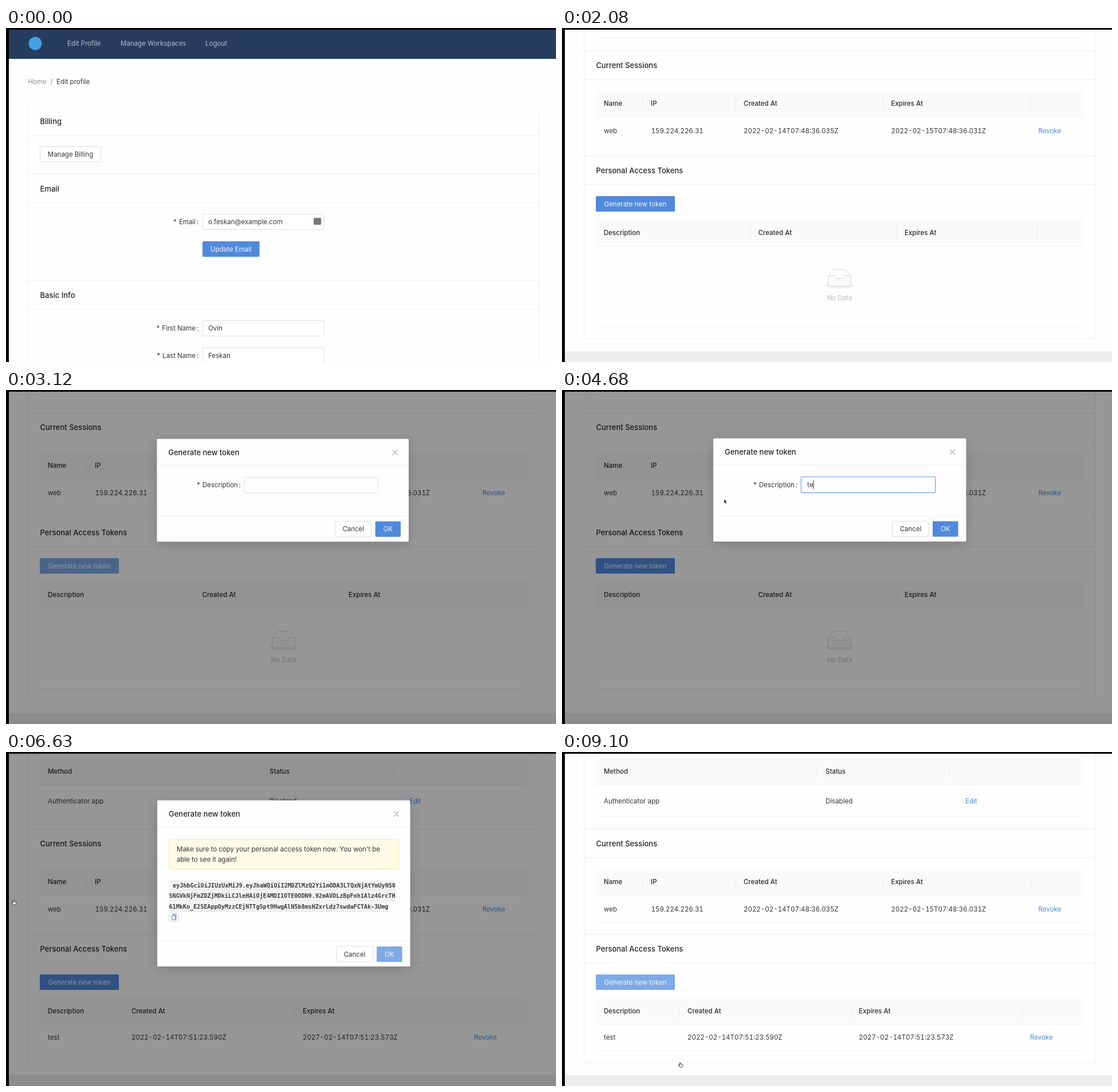
These frames come from a looping animation (960 by 584 pixels, 9.23 s). An HTML page:

```html
<!DOCTYPE html>
<html lang="en">
<head>
<meta charset="utf-8">
<title>Access tokens</title>
<style>
  html, body { margin: 0; width: 100%; height: 100%; overflow: hidden; background: #fefefe; }
  svg { display: block; width: 960px; height: 584px; }
  text { font: 11.5px Inter, sans-serif; font-variant-numeric: tabular-nums; fill: #363636; white-space: pre; }
  .h { font-size: 13px; font-weight: 500; fill: #262626; }
  .b { font-weight: 500; fill: #2b2b2b; }
  .link { fill: #4f8bd8; }
  .white { fill: #f4f8fe; }
  .nav { fill: #b4bdca; }
  .dim { fill: #8f8f8f; }
  .none { fill: #bdbdbd; }
  .mid { text-anchor: middle; }
  .end { text-anchor: end; }
  .code { font: bold 10.1px "DejaVu Sans Mono", monospace; fill: #3c3c3c; }
  #modal { filter: drop-shadow(0 4px 9px rgba(0, 0, 0, .16)); }
</style>
</head>
<body>
<svg id="stage" viewBox="0 0 960 584"></svg>
<script>
const LOOP = 9230, STEP = 130;
const BLUE = '#5189dc', HOVER = '#7eaae7', EDGE = '#efefef', FIELD = '#dedede';
const $ = id => document.getElementById(id);

// ---- drawing helpers
const text = (x, y, s, cls = '') => `<text x="${x}" y="${y}" dy=".36em" class="${cls}">${s}</text>`;
const box = (x, y, w, h, fill, stroke = 'none', extra = '') =>
  `<rect x="${x}" y="${y}" width="${w}" height="${h}" fill="${fill}" stroke="${stroke}" ${extra}/>`;
const rule = (y, x1 = 39, x2 = 930, color = EDGE) => box(x1, y, x2 - x1, 1, color);
const group = (id, s) => `<g id="${id}">${s}</g>`;
const field = (x, y, w, s = '') => box(x + .5, y + .5, w - 1, 27, '#fff', FIELD, 'rx="1.5"') + text(x + 10, y + 14, s);
const button = (x, y, w, s, id) => id
  ? box(x, y, w, 27, BLUE, 'none', `id="${id}" rx="1.5"`) + text(x + w / 2, y + 13.5, s, 'white mid')
  : box(x + .5, y + .5, w - 1, 27, '#fff', FIELD, 'rx="1.5"') + text(x + w / 2, y + 14, s, 'mid');
const label = (x, y, s) => text(x, y, `* ${s}<tspan dx="2">:</tspan>`, 'end');
const section = (y, s, first) => (first ? '' : rule(y - .5, 39, 930, '#ebebeb')) + text(59.5, y + 25.5, s, 'h') + rule(y + 49.5);

function table(y, h, heads, seps) {
  return box(59, y, 851, h, '#fafafa') + rule(y + h - .5, 59, 910, '#f0f0f0') +
    heads.map(([x, s]) => text(x, y + h / 2, s, 'b')).join('') +
    seps.map(x => box(x, y + h / 2 - 10.5, 1, 21, '#ebebeb')).join('');
}

function formRows(y, rows, action) {
  const end = y + rows.length * 47.5;
  return rows.map(([name, value], i) =>
    label(336, y + i * 47.5, name) + field(343, y - 14 + i * 47.5, 212.5, value)).join('') +
    button(343, end - 13.5, 99.5, action, 'b' + y);
}

// ---- page
const upper =
  box(5, 0, 955, 54, '#273d5d') + '<circle cx="51" cy="27" r="11.5" fill="#43a3e2"/>' +
  text(107, 27, 'Edit Profile', 'nav') + text(200, 27, 'Manage Workspaces', 'nav') + text(348, 27, 'Logout', 'nav') +
  text(38.5, 94, 'Home', 'dim') + text(77.5, 94, '/', 'dim') + text(88, 94, 'Edit profile') +
  section(138, 'Billing', true) + button(59, 206.5, 107, 'Manage Billing') +
  section(255.5, 'Email') + formRows(339, [['Email', 'o.feskan@example.com']], 'Update Email') +
  box(537, 332, 13, 12, '#777', 'none', 'rx="1.5"') +
  section(442, 'Basic Info') + formRows(525, [['First Name', 'Ovin'], ['Last Name', 'Feskan']], 'Update Info') +
  section(675, 'Password') +
  formRows(758, [['Current Password', ''], ['New Password', ''], ['Confirm Password', '']], 'Update') +
  section(957, 'Two-Factor Authentication') +
  table(1027, 46.5, [[73, 'Method'], [460, 'Status']], [445, 675.5]) +
  text(73, 1102, 'Authenticator app') + text(460, 1102, 'Disabled') + text(704, 1102, 'Edit', 'link') +
  rule(1128, 59, 910) +
  section(1151, 'Current Sessions') +
  table(1220, 46.5, [[73, 'Name'], [155, 'IP'], [317, 'Created At'], [574.5, 'Expires At']], [140.5, 302.5, 560, 817.5]) +
  text(73, 1290.5, 'web') + text(155.5, 1290.5, '159.224.226.31') +
  text(317, 1290.5, '2022-02-14T07:48:36.035Z') + text(574.5, 1290.5, '2022-02-15T07:48:36.031Z') +
  text(831.5, 1290.5, 'Revoke', 'link') + rule(1313.5, 59, 910) +
  section(1335, 'Personal Access Tokens') + button(59, 1405, 138, 'Generate new token', 'gen');

const card = bottom =>
  box(38.5, 137.5, 892, bottom - 138, 'none', EDGE, 'rx="2"') + box(5, bottom + 21, 955, 60, '#eeeeef');

const emptyList = card(1655) +
  table(1446, 46, [[73, 'Description'], [342.5, 'Created At'], [598, 'Expires At']], [328.5, 584, 829]) +
  `<g transform="translate(465 1533)" stroke="#d8d8d8">
     <ellipse cx="19.5" cy="28" rx="26" ry="5.5" fill="#f2f2f2" stroke="none"/>
     <path d="M0 11L9 0H30L39 11V27Q39 29 37 29H2Q0 29 0 27Z" fill="#fefefe"/>
     <path d="M0 11H11C11 14 12.500 16 15 16H24C26.500 16 28 14 28 11H39V27Q39 29 37 29H2Q0 29 0 27Z" fill="#fafafa"/>
   </g>` + text(484.5, 1583, 'No Data', 'none mid') + rule(1633, 59, 910);

const tokenList = card(1560) +
  table(1446, 46, [[73, 'Description'], [219, 'Created At'], [518, 'Expires At']], [204.5, 504.5, 802.5]) +
  text(73, 1515, 'test') + text(219, 1515, '2022-02-14T07:51:23.590Z') +
  text(518, 1515, '2027-02-14T07:51:23.573Z') + text(817, 1515, 'Revoke', 'link') + rule(1538, 59, 910);

// ---- dialog
const token = [
  'eyJhbGciOiJIUzUxMiJ9.eyJhaWQiOiI2MDZlMzQ2Yi1mODA3LTQxNjAtYmUyNS0',
  '5NGVkNjFmZDZjMDkiLCJleHAiOjE4MDI1OTE0ODN9.92mAVDLzBpFnh1Alz4GrcTH',
  '61MkKo_E2SEAppOyMzzCEjNTTg5pt9HwgAlN5b8msHZxrLdz7swdaFCTAk-3Umg'
];
const modal =
  box(264, 84.5, 441.5, 180.5, '#fefefe', 'none', 'id="panel" rx="1.5"') +
  text(284, 108.5, 'Generate new token', 'h') +
  '<path d="M677 104l9 9m0-9l-9 9" stroke="#808080" fill="none"/>' + rule(130.5, 264, 705.5) +
  group('form', label(411, 165.5, 'Description') +
    box(416, 150.5, 237, 30.5, '#d6e4f8', 'none', 'id="glow" rx="3"') +
    box(417.5, 152, 234, 27.5, '#fff', FIELD, 'id="input" rx="1.5"') +
    '<text id="typed" x="428" y="165.5" dy=".36em"></text>' + box(428, 158, 1, 15, '#222', 'none', 'id="caret"')) +
  group('result', box(284.5, 152.5, 401, 52, '#fefbe6', '#fae8a8', 'rx="1.5"') +
    text(298, 169.5, 'Make sure to copy your personal access token now. You won\'t be') +
    text(298, 187.5, 'able to see it again!') +
    token.map((s, i) => {
      const y = 233 + i * 18.6, w = i < 2 ? 395 : 383;
      return box(284.5, y - 8.5, w, 17, '#f3f3f3') + rule(y + 8, 284.5, 284.5 + w, '#e0e0e0') +
        text(i ? 284.5 : 291, y, s, 'code');
    }).join('') +
    box(284.5, 281.5, 17, 15, '#f4f4f4', '#dfdfdf', 'rx="2"') +
    '<path id="copy" d="M290 285.500h5.500v8h-5.500zM291.500 285.500v-1.500h5.500v8h-1.500" fill="none" stroke="#5a8cd6"/>' +
    '<path id="check" d="M289 289l2.500 3 5.500-6" fill="none" stroke="#777" stroke-width="1.200"/>') +
  group('foot', rule(219.5, 264, 705.5) + button(576, 229, 65, 'Cancel') + button(647, 229.5, 44.5, 'OK', 'ok'));

$('stage').innerHTML =
  box(0, 0, 960, 584, '#fefefe') +
  group('page', upper + group('empty', emptyList) + group('list', tokenList)) +
  box(0, 0, 960, 584, '#000', 'none', 'id="mask"') + group('modal', modal) +
  group('cursor',
    '<path id="arrow" d="M0 0V7L1.700 5.500 3 8 4.200 7.400 3 5.100H5.200Z" fill="#111" stroke="#fff" stroke-width=".5"/>' +
    '<path id="hand" d="M-1.500 1V-3.500Q-.700 -4.500 0 -3.500V-1.500L3 -1Q4 0 3.500 2L2.500 4H-1.500L-4 0Q-3.500 -1.300 -1.500 1Z" fill="#fff" stroke="#333" stroke-width=".9"/>') +
  box(0, 0, 5, 584, '#000') + box(0, 0, 960, 3, '#000');

// ---- motion
const clamp = v => Math.max(0, Math.min(1, v));
const within = (t, ...spans) => spans.some(([a, b]) => t >= a && t < b);
const show = (id, on) => $(id).style.display = on ? '' : 'none';

function bezier(x1, y1, x2, y2) {
  const at = (u, a, b) => 3 * (1 - u) ** 2 * u * a + 3 * (1 - u) * u * u * b + u ** 3;
  return x => {
    let lo = 0, hi = 1;
    for (let i = 0; i < 24; i++) {
      const m = (lo + hi) / 2;
      if (at(m, x1, x2) < x) lo = m; else hi = m;
    }
    return at(lo, y1, y2);
  };
}
const outCirc = bezier(.08, .82, .17, 1), inOutCirc = bezier(.78, .14, .15, .86);

const OPEN = 2888, SAVED = 5720, COPIED = 7280, CLOSE = 8106;
const tracks = [
  [[3510, 215, 290], [4030, 283, 191], [5070, 283, 191], [5460, 60, 250]],
  [[6630, 14, 263], [6890, 14, 263], [7280, 120, 300], [7540, 200, 320], [7930, 341, 345],
   [8320, 341, 345], [8710, 260, 450], [9100, 207, 547]]
];

function cursorAt(t) {
  const track = tracks.find(k => t >= k[0][0] && t <= k[k.length - 1][0]);
  if (!track) return null;
  const i = Math.max(1, track.findIndex(p => p[0] >= t));
  const [a, b] = [track[i - 1], track[i]], f = (t - a[0]) / (b[0] - a[0]);
  return [a[1] + (b[1] - a[1]) * f, a[2] + (b[2] - a[2]) * f];
}

function draw(t) {
  const saved = t >= SAVED;
  const x = clamp(t / 1430) ** .85;
  const scroll = saved ? 1016 : 1111 * x * x * (3 - 2 * x);
  $('page').setAttribute('transform', `translate(0 ${-scroll})`);
  show('empty', !saved);
  show('list', saved);
  $('gen').setAttribute('fill', within(t, [2210, 3640], [8710, LOOP]) ? HOVER : BLUE);

  const shown = t < CLOSE ? outCirc(clamp((t - OPEN) / 300)) : 1 - inOutCirc(clamp((t - CLOSE) / 200));
  const fade = clamp((t - OPEN) / 200) - clamp((t - CLOSE) / 200);
  const s = .2 + .8 * shown;
  $('mask').setAttribute('opacity', .41 * fade);
  show('modal', shown > .01);
  $('modal').style.opacity = shown;
  $('modal').setAttribute('transform', `translate(${131.6 * (1 - s)} ${304.6 * (1 - s)}) scale(${s})`);

  show('form', !saved);
  show('result', saved);
  $('panel').setAttribute('height', saved ? 290.5 : 180.5);
  $('foot').setAttribute('transform', `translate(0 ${saved ? 110.500 : 0})`);
  show('copy', t < COPIED);
  show('check', t >= COPIED);
  $('ok').setAttribute('fill', within(t, [5330, 6760], [7930, LOOP]) ? HOVER : BLUE);

  const focus = within(t, [3900, 5330]);
  const count = Math.round(4 * clamp((t - 4420) / 520));
  $('typed').textContent = 'test'.slice(0, count);
  $('input').setAttribute('stroke', focus ? '#76a3e0' : FIELD);
  show('glow', focus);
  show('caret', focus);
  if (focus) $('caret').setAttribute('x', 428 + (count ? $('typed').getComputedTextLength() : 0));

  const p = cursorAt(t), hand = within(t, [6630, 7020], [8840, LOOP]);
  show('cursor', p);
  show('hand', hand);
  show('arrow', !hand);
  if (p) $('cursor').setAttribute('transform', `translate(${p[0]} ${p[1]})`);
}

const start = performance.now();
function tick() {
  const t = (performance.now() - start) % LOOP;
  draw(Math.floor(t / STEP) * STEP);
  requestAnimationFrame(tick);
}
tick();
</script>
</body>
</html>
```
